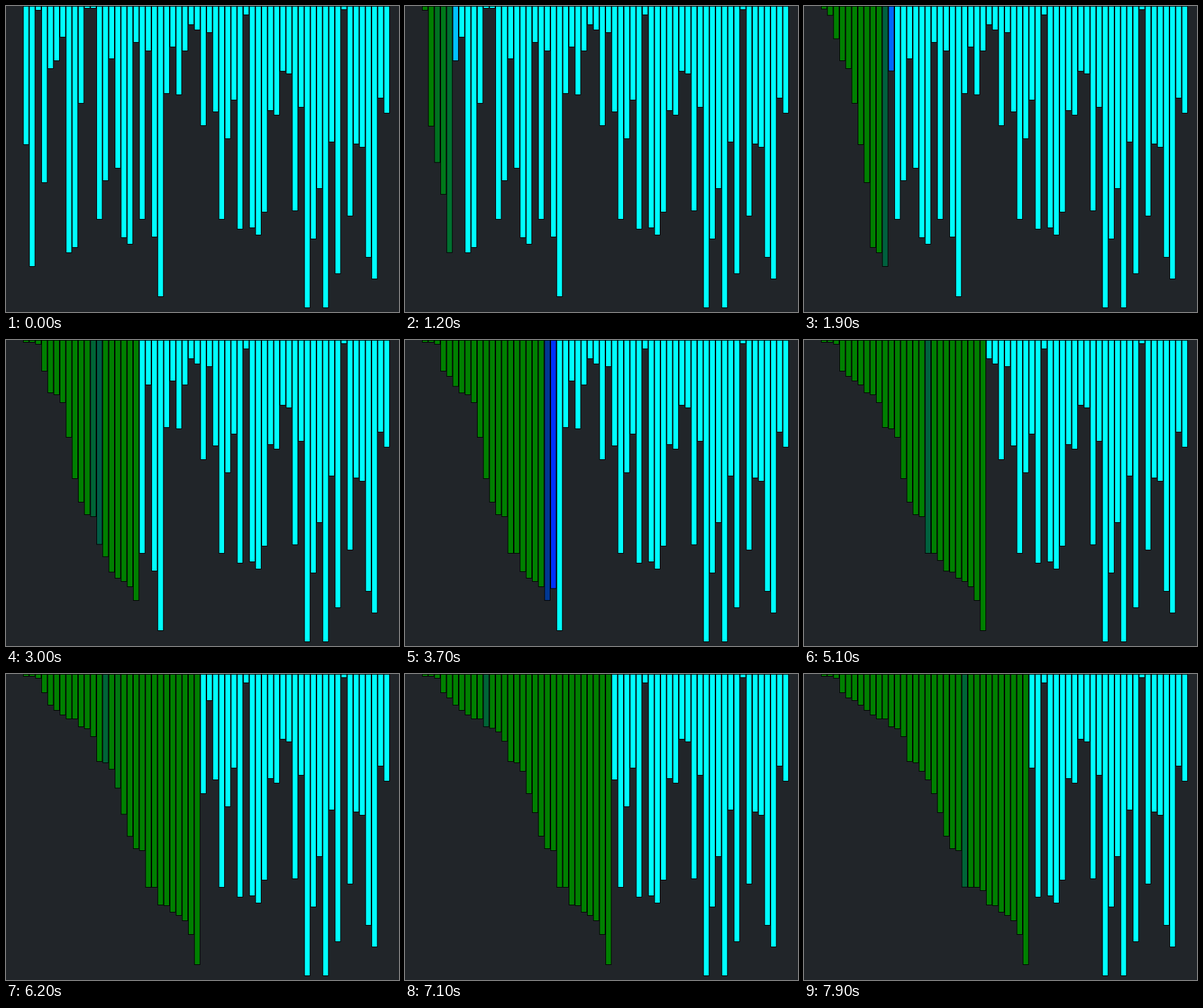
Recreate the animation shown at these times as an HTML page with a canvas. Size 600 px wide and 467 px high, loop 8000 ms.

```html
<!DOCTYPE html>
<html lang="en">
<head>
<meta charset="utf-8">
<title>Insertion sort</title>
<style>
  html, body { margin: 0; height: 100%; overflow: hidden; background: #212529; }
  canvas { display: block; }
</style>
</head>
<body>
<canvas id="stage" width="600" height="467"></canvas>
<script>
const LOOP = 8000, TICK = 1000 / 60, DURATION = 100;
const LEFT = 26, PITCH = 9.333, BORDER = 0.95;
const CYAN = [0, 255, 255], BLUE = [0, 0, 255], GREEN = [0, 128, 0];
const values = [
  211, 397, 6, 269, 95, 83, 47, 376, 368, 148, 3, 3, 325, 266, 80,
  247, 353, 363, 55, 325, 68, 352, 443, 133, 62, 135, 68, 28, 36, 182,
  40, 161, 325, 202, 143, 340, 13, 338, 349, 314, 159, 166, 99, 103, 312,
  154, 460, 355, 278, 460, 207, 408, 5, 320, 210, 215, 383, 416, 140, 163];

// Pace of the sort: [step, ms]
const pace = [[0, 975], [44, 1882], [97, 2970], [155, 4264], [192, 5060], [243, 6154.5], [325, 7835]];

function stepTime(n) {
  let k = 1;
  while (k < pace.length - 1 && n > pace[k][0]) k++;
  const [n0, t0] = pace[k - 1], [n1, t1] = pace[k];
  const t = t0 + (t1 - t0) * (n - n0) / (n1 - n0);
  return Math.ceil(t / TICK) * TICK;
}

// CSS "ease": cubic-bezier(.25, .1, .25, 1)
function ease(x) {
  if (x <= 0) return 0;
  if (x >= 1) return 1;
  const curve = (a, b, u) => 3 * a * u * (1 - u) ** 2 + 3 * b * u * u * (1 - u) + u ** 3;
  let lo = 0, hi = 1;
  for (let i = 0; i < 20; i++) {
    const mid = (lo + hi) / 2;
    if (curve(0.25, 0.25, mid) < x) lo = mid; else hi = mid;
  }
  return curve(0.1, 1, lo);
}

// A property with CSS-like transitions, including shortened reversals
class Track {
  constructor(value) {
    this.parts = [{ start: -1e9, length: 1, from: value, to: value, origin: value, factor: 1 }];
  }
  at(t) {
    let k = this.parts.length - 1;
    while (this.parts[k].start > t) k--;
    const part = this.parts[k];
    const p = ease((t - part.start) / part.length);
    return part.from.map((v, i) => v + (part.to[i] - v) * p);
  }
  set(t, to) {
    const last = this.parts[this.parts.length - 1];
    if (String(last.to) === String(to)) return;
    const p = ease((t - last.start) / last.length);
    const reversing = p < 1 && String(last.origin) === String(to);
    const factor = reversing ? p * last.factor + 1 - last.factor : 1;
    this.parts.push({
      start: t, length: DURATION * factor, from: this.at(t), to,
      origin: reversing ? last.to : p < 1 ? this.at(t) : last.to, factor
    });
  }
}

const bars = values.map(v => ({ height: new Track([v]), color: new Track(CYAN) }));

function recordSort() {
  const heights = values.slice(), colors = values.map(() => CYAN);
  let step = 0;
  const wait = () => {
    const t = stepTime(step++);
    bars.forEach((bar, i) => {
      bar.height.set(t, [heights[i]]);
      bar.color.set(t, colors[i]);
    });
    return t < LOOP;
  };
  colors[0] = GREEN;
  for (let i = 1; i < heights.length; i++) {
    const key = heights[i];
    let j = i - 1;
    colors[i] = BLUE;
    if (!wait()) return;
    while (j >= 0 && heights[j] > key) {
      colors[j] = BLUE;
      heights[j + 1] = heights[j];
      j--;
      if (!wait()) return;
      colors.fill(GREEN, 0, i + 1);
    }
    heights[j + 1] = key;
    colors[i] = GREEN;
  }
}

const ctx = document.getElementById("stage").getContext("2d");

function draw() {
  const t = performance.now() % LOOP;
  ctx.fillStyle = "#212529";
  ctx.fillRect(0, 0, 600, 467);
  bars.forEach((bar, i) => {
    const x = LEFT + i * PITCH, [h] = bar.height.at(t);
    ctx.fillStyle = "#000";
    ctx.fillRect(x, 0, PITCH, h + BORDER);
    ctx.fillStyle = `rgb(${bar.color.at(t).map(Math.round)})`;
    ctx.fillRect(x + BORDER, BORDER, PITCH - 2 * BORDER, Math.max(0, h - BORDER));
  });
  requestAnimationFrame(draw);
}

recordSort();
draw();
</script>
</body>
</html>
```
